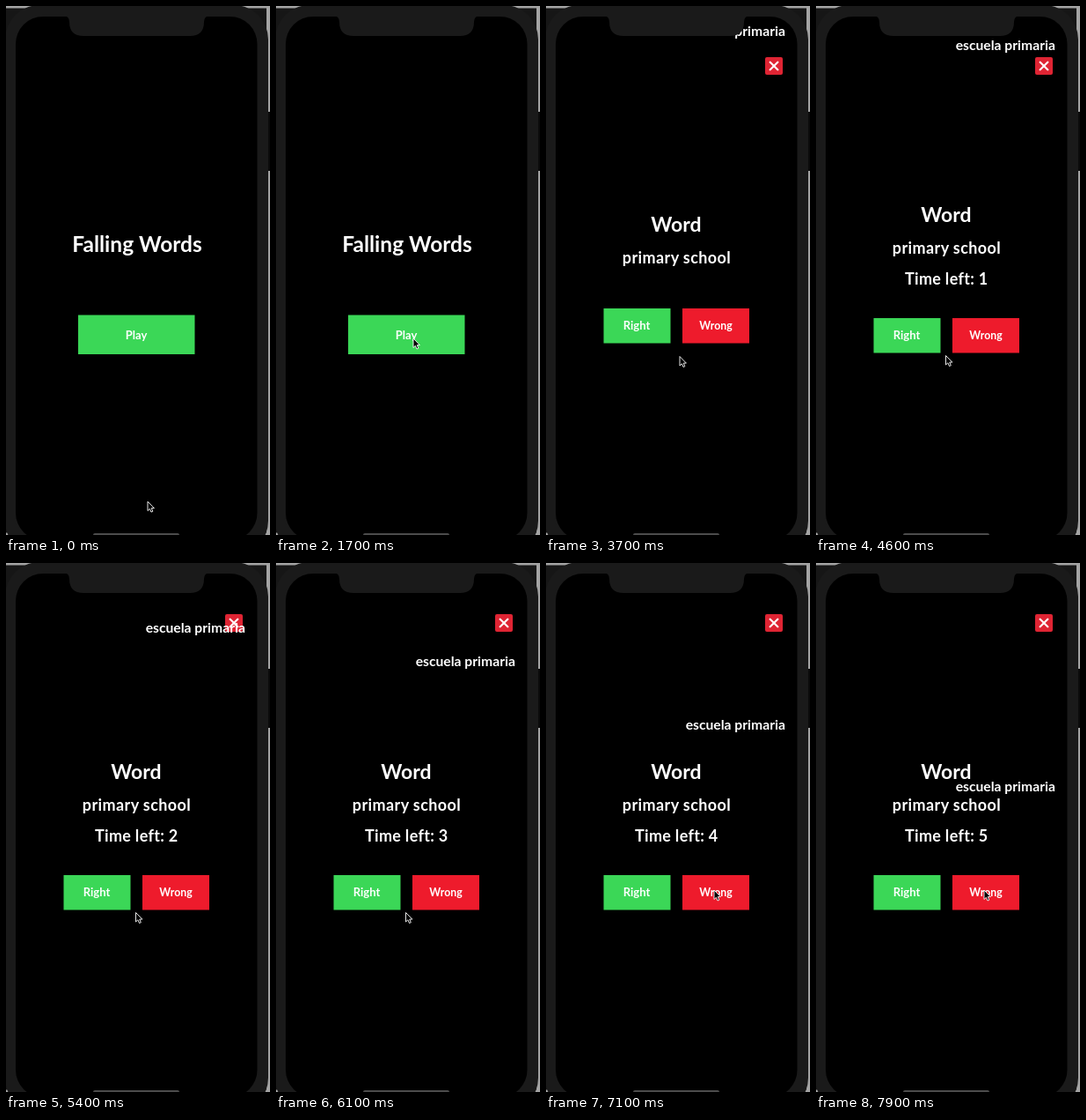
Animation, 300 px wide and 600 px high, one loop 8 s. Source, as an HTML page:

```html
<!DOCTYPE html>
<html lang="en">
<head>
<meta charset="utf-8">
<title>Falling Words</title>
<style>
  html, body { margin: 0; width: 100%; height: 100%; overflow: hidden; background: #000; }
  svg { display: block; width: 300px; height: 600px; }
  text { font-family: Lato, "Open Sans", sans-serif; font-weight: 700; fill: #fff; }
  .mid { text-anchor: middle; }
  .end { text-anchor: end; }
  .go { fill: #3bd757; }
  .stop { fill: #ee1b2c; }
</style>
</head>
<body>
<svg viewBox="0 0 300 600">
  <!-- desktop, phone body and screen -->
  <rect width="300" height="600" fill="#a4a4a4"/>
  <rect y="2.5" width="296" height="595" fill="#161616"/>
  <rect x="294" y="120" width="6" height="67" fill="#0b0b0b"/>
  <rect x="-1" y="-1" width="299" height="624" rx="39" fill="#1a1a1a"/>
  <rect x="11" y="12" width="274.5" height="594" rx="31"/>

  <g id="menu">
    <text class="mid" x="149" y="279" font-size="24.5">Falling Words</text>
    <rect class="go" x="82" y="350.5" width="132.5" height="44.5"/>
    <text class="mid" x="148" y="377.5" font-size="13">Play</text>
  </g>

  <g id="game">
    <rect x="249" y="58" width="20" height="20" rx="2" fill="#df2433"/>
    <path d="M254.7 63.7l8.6 8.6m0-8.6l-8.6 8.6" stroke="#fff" stroke-width="2.2" stroke-linecap="round"/>
    <g id="heading">
      <text class="mid" x="148" y="244.5" font-size="23">Word</text>
      <text class="mid" x="148.5" y="280.5" font-size="18" letter-spacing=".4">primary school</text>
    </g>
    <text id="timer" x="101" y="316" font-size="18" letter-spacing=".3"></text>
    <g id="answers">
      <rect class="go" x="65.5" y="354" width="76" height="39.5"/>
      <text class="mid" x="103" y="378" font-size="13">Right</text>
      <rect class="stop" x="155" y="354" width="76" height="39.5"/>
      <text class="mid" x="193" y="378" font-size="12.3">Wrong</text>
    </g>
    <text id="drop" class="end" x="272" font-size="15.7">escuela primaria</text>
  </g>

  <path fill="#1a1a1a" d="M66 11Q72 12 72 18Q72 34 88 34H209Q225 34 225 18Q225 12 231 11Z"/>
  <rect x="99" y="598" width="98" height="4" rx="2" fill="#4c4c4c"/>
  <path id="cursor" d="M0 0V10.5L2.4 8.3L4 12L5.8 11.2L4.3 7.6H7.4Z"
        stroke="#fff" stroke-width=".9" stroke-linejoin="round"/>
</svg>
<script>
const LOOP = 8000, STEP = 100;
const GAME_IN = 2500, FADE = 300;
const TIMER_IN = 3800;
const FALL = { start: 3350, time: 10000, from: 33, distance: 534 };

// time, x, y of the pointer tip
const POINTER = [
  [0, 161, 562], [700, 150, 386], [900, 150, 386], [1700, 156, 377],
  [2900, 156, 377], [3700, 152, 397.5], [4300, 147.5, 396.5],
  [6300, 147.5, 396.5], [7000, 191, 371], [LOOP, 191, 371]
];

const $ = id => document.getElementById(id);
const clamp = v => Math.min(1, Math.max(0, v));
const smooth = p => p * p * (3 - 2 * p);
const move = (el, x, y) => el.setAttribute("transform", `translate(${x} ${y})`);

// cubic-bezier(.42, 0, .58, 1)
function easeInOut(x) {
  let lo = 0, hi = 1;
  for (let i = 0; i < 24; i++) {
    const s = (lo + hi) / 2;
    if (1.26 * s - 0.78 * s * s + 0.52 * s ** 3 < x) lo = s; else hi = s;
  }
  return smooth(lo);
}

function pointerAt(t) {
  const i = POINTER.findIndex(k => k[0] > t);
  const [t0, x0, y0] = POINTER[i - 1], [t1, x1, y1] = POINTER[i];
  const p = smooth((t - t0) / (t1 - t0));
  return [x0 + (x1 - x0) * p, y0 + (y1 - y0) * p];
}

function draw(t) {
  const shown = clamp((t - GAME_IN) / FADE);
  $("menu").setAttribute("opacity", 1 - shown);
  $("game").setAttribute("opacity", shown);

  const timed = t >= TIMER_IN;
  const seconds = 1 + Math.floor((t - TIMER_IN) / 1000);
  $("timer").textContent = timed ? `Time left: ${seconds}` : "";
  move($("heading"), 0, timed ? 0 : 11);
  move($("answers"), 0, timed ? 0 : -11);

  const fallen = easeInOut(clamp((t - FALL.start) / FALL.time));
  $("drop").setAttribute("y", FALL.from + FALL.distance * fallen);
  move($("cursor"), ...pointerAt(t));
}

const begin = performance.now();
function frame() {
  const t = (performance.now() - begin) % LOOP;
  draw(Math.floor(t / STEP) * STEP);
  requestAnimationFrame(frame);
}
frame();
</script>
</body>
</html>
```
